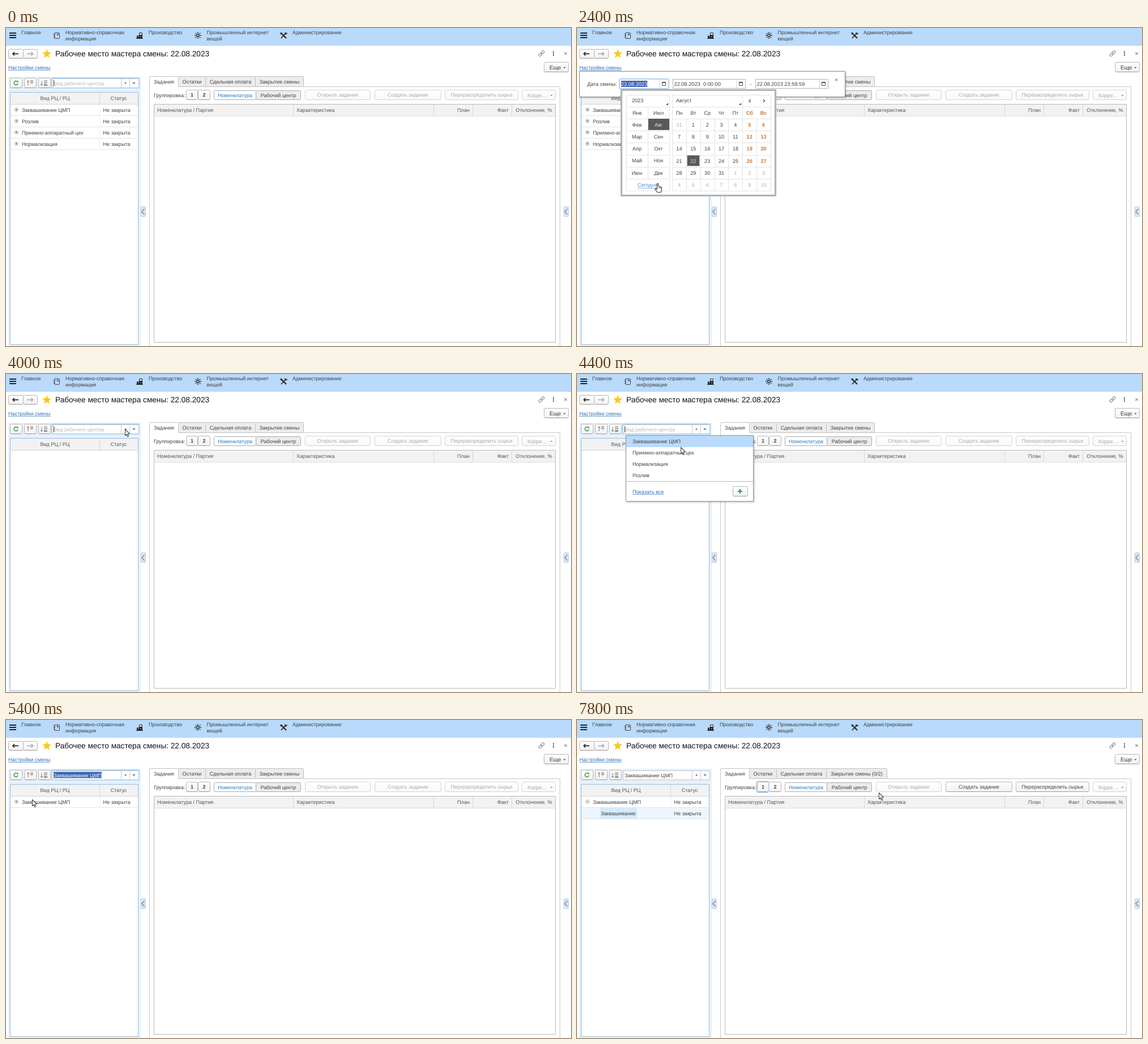
An HTML page with a canvas for the animation above (8000 ms loop, 998 by 561 pixels).

```html
<!DOCTYPE html>
<html lang="ru">
<head>
<meta charset="utf-8">
<title>Рабочее место мастера смены</title>
<style>
html, body { margin: 0; width: 100%; height: 100%; overflow: hidden; background: #fff; }
canvas { display: block; }
</style>
</head>
<body>
<canvas id="stage" width="998" height="561"></canvas>
<script>
const ctx = document.getElementById('stage').getContext('2d', { alpha: false });
const LOOP = 8000;
const FONT = '"Liberation Sans", Arial, sans-serif';
const SMALL = 9.1, DATE = 9.25;
const INK = '#404040', PALE = '#a9a9a9', LINK = '#2f6fb7', SKY = '#b9dafa', PICK = '#3f64b5';
const CENTER = 'Заквашивание ЦМП';

// Pointer poses: time, tip x, tip y, hand flag
const POINTER = [
  [600, 58, 68, 1], [1200, 74, 75, 0], [1400, 89, 81, 0], [1600, 128, 92, 0],
  [1800, 152, 97, 0], [2200, 146, 205, 0], [2400, 142, 274, 1], [2800, 152, 268, 0],
  [3000, 165, 262, 0], [3400, 172, 238, 0], [3600, 188, 172, 0], [3800, 205, 118, 0],
  [4000, 210, 97, 0], [4400, 183, 129, 0], [4600, 154, 120, 0], [5000, 112, 126, 0],
  [5200, 72, 136, 0], [5400, 46, 140, 0], [5600, 24, 143, 0], [5800, 18, 143, 0],
  [6000, 44, 153, 0], [6200, 72, 160, 0], [6800, 84, 160, 0], [7000, 180, 128, 0],
  [7200, 269, 95, 0], [7800, 533, 128, 0]
];

function rect(x, y, w, h, fill) {
  ctx.fillStyle = fill;
  ctx.fillRect(x, y, w, h);
}

function box(x, y, w, h, fill, stroke, r = 0) {
  ctx.beginPath();
  ctx.roundRect(x + .5, y + .5, w - 1, h - 1, r);
  if (fill) { ctx.fillStyle = fill; ctx.fill(); }
  if (stroke) { ctx.strokeStyle = stroke; ctx.lineWidth = 1; ctx.stroke(); }
}

function shadowed(x, y, w, h, stroke) {
  ctx.save();
  ctx.shadowColor = 'rgba(0,0,0,.3)';
  ctx.shadowBlur = 3;
  ctx.shadowOffsetX = ctx.shadowOffsetY = 1;
  rect(x, y, w, h, '#fff');
  ctx.restore();
  box(x, y, w, h, '#fff', stroke);
}

function text(s, x, y, color = INK, align = 'left', size = SMALL, weight = '') {
  ctx.font = `${weight} ${size}px ${FONT}`;
  ctx.fillStyle = color;
  ctx.textAlign = align;
  ctx.fillText(s, x, y + size * .35);
}

function link(s, x, y) {
  text(s, x, y, LINK);
  rect(x, Math.round(y + 4), ctx.measureText(s).width, 1, '#6d9bd0');
}

function path(points, color, width = 1, fill) {
  ctx.beginPath();
  for (let i = 0; i < points.length; i += 2) ctx.lineTo(points[i], points[i + 1]);
  if (fill) { ctx.closePath(); ctx.fillStyle = fill; ctx.fill(); }
  if (color) { ctx.strokeStyle = color; ctx.lineWidth = width; ctx.stroke(); }
}

function ring(x, y, r, color, width = 1, from = 0, to = 7) {
  ctx.beginPath();
  ctx.arc(x, y, r, from, to);
  ctx.strokeStyle = color;
  ctx.lineWidth = width;
  ctx.stroke();
}

function caretDown(x, y, color = '#444') {
  path([x - 2, y - 1, x + 2, y - 1, x, y + 1.3], null, 1, color);
}

function cross(x, y, r = 2.2, color = '#555') {
  path([x - r, y - r, x + r, y + r], color);
  path([x - r, y + r, x + r, y - r], color);
}

function button(x, y, w, h, label, on = true, weight = '') {
  const g = ctx.createLinearGradient(0, y, 0, y + h);
  g.addColorStop(0, '#fff');
  g.addColorStop(1, on ? '#f0f0f0' : '#f8f8f8');
  box(x, y, w, h, g, on ? '#b5b5b5' : '#d2d2d2', 2);
  if (on) rect(x + 2, y + h - 1, w - 4, 1, '#999');
  if (label) text(label, x + w / 2, y + h / 2, on ? INK : PALE, 'center', SMALL, weight);
}

function selected(s, x, y, size) {
  ctx.font = `${size}px ${FONT}`;
  rect(x, y - 6, ctx.measureText(s).width, 11, PICK);
  text(s, x, y, '#fff', 'left', size);
}

function header() {
  rect(0, 0, 998, 31, SKY);
  rect(0, 31, 998, 1, '#e3effb');
  for (const y of [8, 12, 16]) rect(6, y, 12, 2, '#222');
  text('Главное', 27, 8);
  text('Нормативно-справочная', 105, 8);
  text('информация', 105, 19);
  text('Производство', 252, 8);
  text('Промышленный интернет', 354.5, 8);
  text('вещей', 354.5, 19);
  text('Администрирование', 506, 8);

  box(85, 8, 10, 11, null, '#444', 1);
  for (const y of [10, 13, 16]) rect(84, y, 3, 1, '#444');
  rect(90, 10, 3, 3, '#667');

  path([231, 18, 231, 13.5, 235, 13.5, 235, 12, 241, 12, 241, 18], null, 1, '#222');
  box(235, 8, 6, 5, null, '#333');
  rect(233, 15, 2, 1, SKY); rect(237, 15, 2, 1, SKY);
  rect(230, 18, 12, 1, '#222');

  for (let i = 0; i < 8; i++) {
    const c = Math.cos(i * Math.PI / 4), s = Math.sin(i * Math.PI / 4);
    path([339 + 2 * c, 13 + 2 * s, 339 + 5 * c, 13 + 5 * s], '#333', .9);
    rect(338.3 + 5.2 * c, 12.3 + 5.2 * s, 1.5, 1.5, '#222');
  }
  ring(339, 13, 2.2, '#222', 1.2);

  path([486, 9, 495, 18], '#222', 2.2);
  path([495, 8.5, 486, 18], '#222', 1.6);
  path([484.5, 8, 488, 8, 485, 12], null, 1, '#222');
  ring(494.5, 9, 1.8, '#222', 1.2, -.2, 4);
}

function navArrow(x, dir, color) {
  path([x - 5, 45.5, x + 5, 45.5], color, 1.7);
  path([x + 2 * dir, 42.5, x + 5 * dir, 45.5, x + 2 * dir, 48.5], color, 1.7);
}

function titleBar() {
  button(4, 37, 27, 17);
  button(30, 37, 26, 17);
  navArrow(17, -1, '#222');
  navArrow(42.5, 1, '#aaa');
  const star = [];
  for (let i = 0; i < 10; i++) {
    const a = i * Math.PI / 5 - Math.PI / 2, r = i % 2 ? 3.7 : 8.4;
    star.push(72 + r * Math.cos(a), 45.8 + r * Math.sin(a));
  }
  path(star, null, 1, '#fbc81e');
  text('Рабочее место мастера смены: 22.08.2023', 87, 45.2, '#111', 'left', 13.65);
  link('Настройки смены', 4, 70);

  ctx.save();
  ctx.translate(946, 45);
  ctx.rotate(-Math.PI / 4);
  box(-6.5, -2.5, 7, 5, null, '#777', 2);
  box(-.5, -2.5, 7, 5, null, '#777', 2);
  ctx.restore();
  for (const y of [41, 44, 47]) rect(966, y, 2, 2, '#555');
  cross(988.5, 45, 2.3);
  button(950, 60, 44, 18);
  text('Еще', 960, 69.5, INK, 'left', 10);
  caretDown(986.5, 70);
}

function node(x, y, open) {
  ring(x, y, 3, '#aaa', .9);
  rect(x - 2, y - .5, 4, 1, '#777');
  if (!open) rect(x - .5, y - 2, 1, 4, '#777');
}

function row(i, name, open, child) {
  const y = 144.5 + i * 20;
  if (child) {
    rect(8, y - 9.5, 225, 19, '#edf6fe');
    rect(41, y - 9.5, 65, 19, '#d5eafb');
  } else node(18.5, y - .5, open);
  text(name, child ? 42 : 28, y);
  text('Не закрыта', 171.5, y);
  rect(8, y + 9.5, 225, 1, '#e4e4e4');
  rect(165, y - 9.5, 1, 19, '#eee');
}

function leftPanel(t) {
  rect(4, 86, 234, 475, '#e7f1fb');
  for (const x of [7, 32, 57]) button(x, 88, 22, 18);
  ring(17.5, 97, 3.4, '#2c9a45', 1.5, .2, 5.3);
  path([18.5, 95.6, 22, 95.6, 21.2, 92.4], null, 1, '#2c9a45');
  path([39, 101, 39, 93], '#9a6a3c');
  path([37, 95, 39, 92.5, 41, 95], '#9a6a3c');
  for (const y of [93, 96]) rect(43, y, 5, 1, '#444');
  path([63, 93, 63, 101], '#777');
  path([61, 99, 63, 101.5, 65, 99], '#777');
  for (const y of [93, 96, 99, 101]) rect(67, y, 6, 1, '#555');

  const focus = t < 3000 || t >= 4000 && t < 5800;
  box(81, 89, 154, 17, '#fff', '#b8c4d0');
  if (focus) {
    box(80, 87, 156, 20, null, '#c5e2f8', 1);
    box(80, 88, 155, 18, null, '#9dcdf2', 1);
  }
  rect(203, 90, 1, 15, '#c3cbd3');
  rect(218, 90, 1, 15, '#c3cbd3');
  caretDown(211, 97.5);
  cross(226, 97, 1.8);
  if (t < 4800) {
    text('Вид рабочего центра', 84, 97.5, '#b8b8b8');
    if (focus) rect(84, 92, 1, 11, '#333');
  } else if (focus) selected(CENTER, 84, 97.5, SMALL);
  else text(CENTER, 84, 97.5);

  box(7, 113, 227, 446, '#fff', '#9dbbd6');
  rect(8, 114, 225, 20, '#f2f2f2');
  rect(8, 134, 225, 1, '#d4d4d4');
  rect(165, 114, 1, 20, '#d4d4d4');
  text('Вид РЦ / РЦ', 86.5, 124, '#555', 'center');
  text('Статус', 199, 124, '#555', 'center');

  if (t < 3000) {
    [CENTER, 'Розлив', 'Приемно-аппаратный цех', 'Нормализация'].forEach((s, i) => row(i, s));
  } else if (t < 4000) {
    ctx.setLineDash([1, 1]);
    box(8, 135, 225, 21, null, '#222');
    ctx.setLineDash([]);
  } else if (t >= 5000) {
    row(0, CENTER, t >= 5800);
    if (t >= 5800) row(1, 'Заквашивание', false, true);
  }
}

function handle(x) {
  box(x, 315, 9, 18, '#dce9f6', '#b4c8dc', 1);
  path([x + 6.5, 319, x + 2, 324, x + 6.5, 329], '#6e7f90', 1.2);
}

function rightPanel(t) {
  const ready = t >= 6800;
  box(253, 103, 726, 470, '#fff', '#c8c8c8');
  const tabs = [[253, 52, 'Задания'], [304, 49, 'Остатки'], [352, 89, 'Сдельная оплата'],
    [440, ready ? 108 : 86, ready ? 'Закрытие смены (0/2)' : 'Закрытие смены']];
  tabs.forEach(([x, w, s], i) => {
    box(x, 85, w, 19, i ? '#ececec' : '#fff', '#c0c0c0', 1);
    if (!i) rect(x + 1, 103, w - 2, 2, '#fff');
    text(s, x + w / 2, 94.5, INK, 'center');
  });

  text('Группировка:', 261, 118.5);
  button(318, 109, 21, 18, '1', true, 'bold');
  button(339, 109, 22, 18, '2', true, 'bold');
  if (t >= 7200) {
    box(316, 107, 24, 22, null, '#c5e2f8', 2);
    box(317, 108, 22, 20, null, '#a9cbe8', 2);
  }
  box(367, 110, 75, 17, '#fff', '#aaa', 2);
  text('Номенклатура', 404.5, 118.5, '#2b7bbb', 'center');
  box(441, 110, 80, 17, '#ececec', '#aaa', 2);
  text('Рабочий центр', 481, 118.5, INK, 'center');
  button(528, 109, 116, 18, 'Открыть задание', false);
  button(651, 109, 118, 18, 'Создать задание', ready);
  button(775, 109, 130, 18, 'Перераспределить сырье', ready);
  button(911, 109, 60, 18, '', false);
  text('Корре…', 921, 118.5, PALE);
  caretDown(963.5, 119, '#888');

  box(261, 134, 710, 421, '#fff', '#b9b9b9');
  rect(262, 135, 708, 20, '#f2f2f2');
  rect(262, 155, 708, 1, '#dcdcdc');
  for (const x of [507, 755, 824, 893]) rect(x, 135, 1, 20, '#d8d8d8');
  text('Номенклатура / Партия', 267, 145, '#555');
  text('Характеристика', 513, 145, '#555');
  text('План', 819, 145, '#555', 'right');
  text('Факт', 888, 145, '#555', 'right');
  text('Отклонение, %', 964.5, 145, '#555', 'right');
  handle(238);
  handle(985);
}

function dateField(x, w, s, focus) {
  box(x, 90, w, 17, '#fff', focus ? '#c5d4e2' : '#b5b5b5');
  if (focus) box(x - 1, 89, w + 2, 19, null, '#9dcdf2', 1);
  rect(x + w - 16, 91, 1, 15, '#ccc');
  box(x + w - 12, 95, 7, 7, null, '#555');
  rect(x + w - 12, 95, 7, 2, '#555');
  if (focus) selected(s, x + 3, 99, DATE);
  else text(s, x + 2.5, 99, INK, 'left', DATE);
}

function settings() {
  shadowed(4, 76, 470, 46, '#8c8c8c');
  text('Дата смены:', 18, 99);
  dateField(75, 87, '22.08.2023', true);
  dateField(169, 129, '22.08.2023  0:00:00');
  text('-', 305, 99);
  dateField(315, 129, '22.08.2023 23:59:59');
  cross(458, 91.5);
}

function calendar() {
  box(77, 108, 275, 189, '#fff', '#a2a2a2');
  box(78, 109, 273, 187, null, '#c4c4c4');
  box(79, 110, 271, 185, null, '#a8a8a8');
  const top = 118, pitch = 21.2, dayW = 24.85;
  const rowY = i => 128.3 + i * pitch;
  for (let i = 0; i < 9; i++) {
    const y = Math.round(top - .5 + i * pitch);
    rect(87, y, 77, 1, '#e3e3e3');
    rect(168, y, 174, 1, '#e3e3e3');
  }
  for (const x of [87, 163]) rect(x, 118, 1, 169, '#e3e3e3');
  rect(125, 139, 1, 127, '#e3e3e3');
  for (let i = 0; i < 8; i++) {
    const y = i && i < 5 || i === 6 ? 160 : 118;
    rect(Math.round(168 + i * dayW), y, 1, 287 - y, '#e3e3e3');
  }
  text('2023', 97, rowY(0));
  text('Август', 175, rowY(0));
  for (const x of [161, 290]) path([x, 132, x, 136, x - 4, 136], null, 1, '#555');
  path([306.5, 126, 304, 128.5, 306.5, 131], '#444', 1.2);
  path([329, 126, 331.5, 128.5, 329, 131], '#444', 1.2);

  'Янв Фев Мар Апр Май Июн Июл Авг Сен Окт Ноя Дек'.split(' ').forEach((m, i) => {
    const x = i < 6 ? 106 : 144, y = rowY(1 + i % 6);
    if (m === 'Авг') rect(126, 160, 37, 20, '#595959');
    text(m, x, y, m === 'Авг' ? '#e8e8e8' : INK, 'center');
  });
  text('Сегодня', 107, rowY(7), '#4a8fcb');
  ctx.setLineDash([2, 1]);
  path([107, 282.5, 145, 282.5], '#4a8fcb');
  ctx.setLineDash([]);

  'Пн Вт Ср Чт Пт Сб Вс'.split(' ').forEach((d, c) => {
    const x = 180.5 + c * dayW, weekend = c > 4;
    text(d, x, rowY(1), weekend ? '#c87938' : INK, 'center', SMALL, weekend ? 'bold' : '');
    for (let r = 0; r < 6; r++) {
      const n = r * 7 + c, day = (n + 30) % 31 + 1;
      const inside = n > 0 && n < 32, today = n === 22;
      if (today) box(194, 224, 23, 20, '#595959', '#a5cbe8');
      const color = !inside ? '#b0b0b0' : weekend ? '#c87938' : today ? '#ddd' : INK;
      text(day, x, rowY(2 + r), color, 'center', DATE, inside && weekend ? 'bold' : '');
    }
  });
}

function dropdown() {
  shadowed(86, 108, 226, 117, '#8f989f');
  rect(87, 109, 224, 20, SKY);
  [CENTER, 'Приемно-аппаратный цех', 'Нормализация', 'Розлив']
    .forEach((s, i) => text(s, 98, 118.8 + i * 19.9));
  rect(87, 189, 224, 1, '#b8b8b8');
  link('Показать все', 98, 208);
  button(275, 198, 27, 18);
  rect(284, 206, 8, 2, '#2c9a45');
  rect(287, 203, 2, 8, '#2c9a45');
}

function pointer(t) {
  const pose = POINTER.findLast(p => t >= p[0]);
  if (!pose) return;
  const [, x, y, hand] = pose;
  ctx.save();
  ctx.translate(x + .5, y + .5);
  ctx.lineJoin = 'round';
  if (hand) {
    path([-1, 0, 1, 0, 1.6, 5, 4, 5.3, 7, 7, 7, 11, 5.5, 15.5, -.5, 15.5,
      -4.5, 10, -4, 8.5, -1, 10], '#333', 1.1, '#fff');
    path([3, 6, 3, 8.5], '#333', .8);
    path([5, 6.5, 5, 9], '#333', .8);
  } else {
    path([0, 0, 0, 11, 2.5, 8.8, 4.3, 13, 6.2, 12.1, 4.5, 8.2, 8, 8, 0, 0], '#444', 1.1, '#fff');
  }
  ctx.restore();
}

function draw(now) {
  const t = now % LOOP;
  rect(0, 0, 998, 561, '#fff');
  header();
  titleBar();
  leftPanel(t);
  rightPanel(t);
  if (t >= 1000 && t < 3000) settings();
  if (t >= 2000 && t < 2800) calendar();
  if (t >= 4200 && t < 4800) dropdown();
  pointer(t);
}

ctx.textRendering = 'geometricPrecision';
const start = performance.now();
function tick() {
  draw(performance.now() - start);
  requestAnimationFrame(tick);
}
tick();
</script>
</body>
</html>
```
